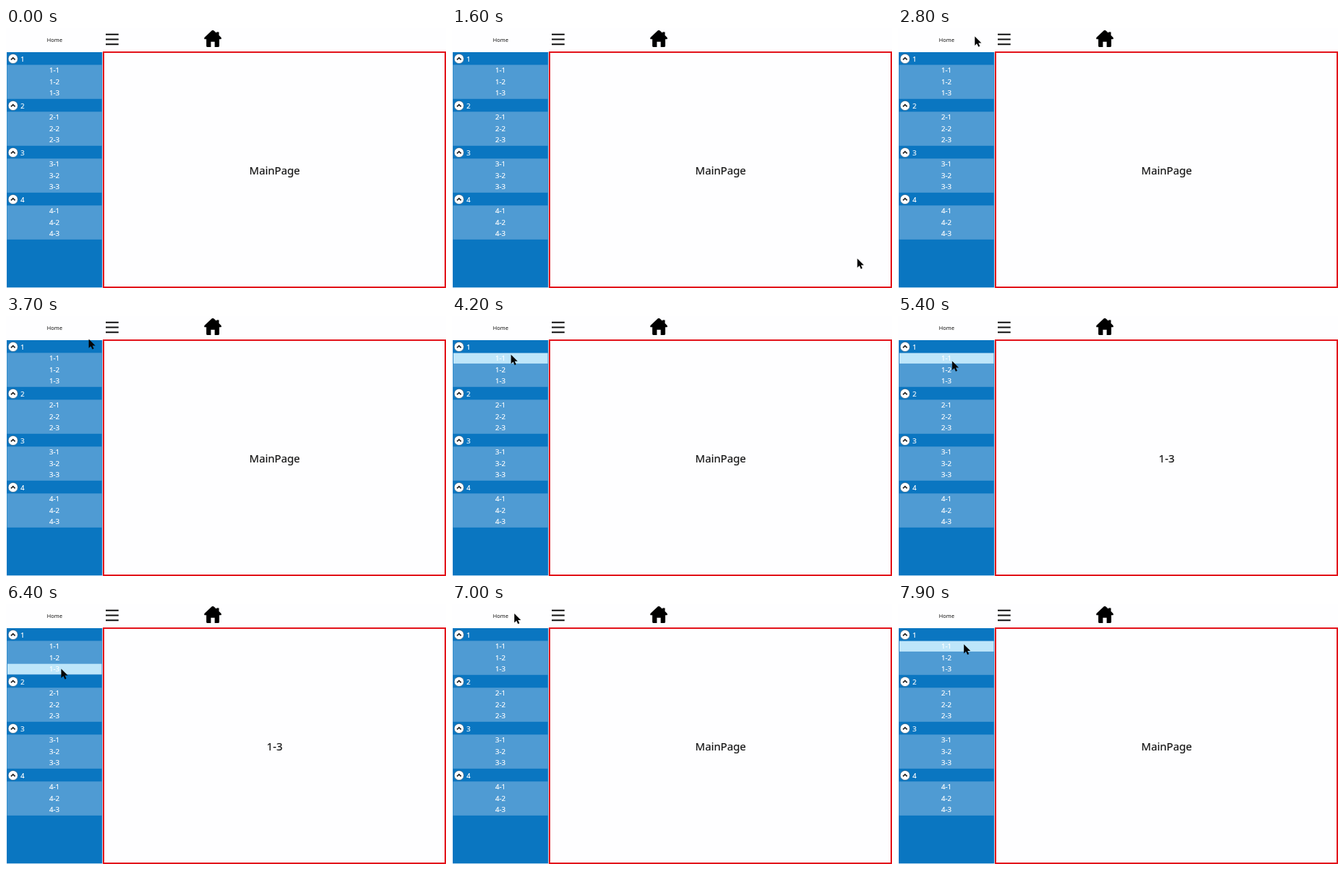
Recreate the animation shown at these times as an HTML page. Size 600 by 355 pixels, loop 8 s.

```html
<!DOCTYPE html>
<html lang="en">
<head>
<meta charset="utf-8">
<title>Side menu</title>
<style>
  html, body { margin: 0; width: 100%; height: 100%; overflow: hidden; background: #fefeff; }
  svg { display: block; width: 600px; height: 355px; }
  text { font-family: "Noto Sans", "Open Sans", sans-serif; fill: #111; }
  .label { font-size: 9.6px; fill: #fff; stroke: #fff; stroke-width: .15px; }
  .mid { text-anchor: middle; }
  #page { font-size: 14.7px; stroke: #111; stroke-width: .15px; }
</style>
</head>
<body>
<svg viewBox="0 0 600 355">
  <text class="mid" x="66.3" y="19" font-size="7.4">Home</text>
  <path d="M136 8.7h17.5M136 15.5h17.5M136 22.3h17.5" stroke="#111" stroke-width="2"/>
  <path d="M280.6 3.6Q282 2.6 283.4 3.6L287 6.8V5.6H290.4V10L293.4 13Q294.4 15.3 292.3 15.3H290.8V24.5Q290.8 26 289.3 26H284.6V18.8H279.4V26H274.7Q273.2 26 273.2 24.5V15.3H271.7Q269.6 15.3 270.6 13Z"/>
  <rect x="1" y="33" width="130.3" height="321.3" fill="#0a76c1"/>
  <g id="menu"></g>
  <rect x="133" y="33" width="466" height="321" fill="none" stroke="#e3141c" stroke-width="2"/>
  <text id="page" class="mid" x="366.3" y="200"></text>
  <path id="cursor" d="M0 0V12.4L2.9 9.8L5 14.2L7 13.2L5 9H9Z" fill="#050505"/>
</svg>
<script>
const LOOP = 8000, STEP = 100;
const GROUPS = 4, ROWS = 3, TOP = 33, PITCH = 64, HEADER = 17.3, ROW = 15.5;
const menu = document.getElementById('menu');
const page = document.getElementById('page');
const cursor = document.getElementById('cursor');

// Places the pointer visits; a click opens whatever lies under it
const stop = (t, x, y, click) => ({ t, x, y, click });
const stops = [
  stop(1500, 590, 340),
  stop(2800, 104.7, 11.5),
  stop(3700, 112.8, 31.4),
  stop(4300, 74, 57, true),
  stop(4700, 68.3, 76.5, true),
  stop(5000, 71, 88, true),
  stop(5400, 73.8, 61.5),
  stop(5700, 80, 21),
  stop(6000, 76, 56, true),
  stop(6400, 75.3, 88.5, true),
  stop(6900, 85, 13, true),
  stop(7700, 85, 13),
  stop(7900, 89.8, 55)
];

let markup = '';
for (let g = 0; g < GROUPS; g++) {
  const y = TOP + g * PITCH;
  markup += `<circle cx="9.6" cy="${y + 9}" r="6.6" fill="#fff" stroke="#24577f" stroke-width=".7"/>
    <path d="M6.8 ${y + 10.4}l2.8-2.8l2.8 2.8" fill="none" stroke="#222" stroke-width="1.6"/>
    <text class="label" x="19.8" y="${y + 12.8}">${g + 1}</text>
    <rect x="1.4" y="${y + HEADER}" width="129.2" height="${ROWS * ROW}" fill="#4f9bd3"/>`;
  for (let r = 0; r < ROWS; r++) {
    const top = y + HEADER + r * ROW;
    markup += `<rect class="item" x="2" y="${top + .4}" width="128.5" height="14.2"/>
      <text class="label mid" x="66" y="${top + 11.1}">${g + 1}-${r + 1}</text>`;
  }
}
menu.innerHTML = markup;
const items = [...menu.querySelectorAll('.item')];

// Index of the menu row at a point, or -1
function rowAt({ x, y }) {
  const g = Math.floor((y - TOP) / PITCH);
  const r = Math.floor((y - TOP - g * PITCH - HEADER) / ROW);
  const inside = x > 1 && x < 131 && g >= 0 && g < GROUPS && r >= 0 && r < ROWS;
  return inside ? g * ROWS + r : -1;
}

function pageName(t) {
  const last = stops.filter(s => s.click && s.t <= t).pop();
  const row = last ? rowAt(last) : -1;
  return row < 0 ? 'MainPage' : `${Math.floor(row / ROWS) + 1}-${row % ROWS + 1}`;
}

function cursorAt(t) {
  const i = stops.findIndex(s => s.t > t);
  if (i === 0) return { x: -50, y: -50 };
  if (i < 0) return stops[stops.length - 1];
  const a = stops[i - 1], b = stops[i];
  const k = (t - a.t) / (b.t - a.t);
  return { x: a.x + (b.x - a.x) * k, y: a.y + (b.y - a.y) * k };
}

function draw(now) {
  const t = Math.floor(now % LOOP / STEP) * STEP;
  const point = cursorAt(t);
  const hovered = rowAt(point);
  cursor.setAttribute('transform', `translate(${point.x} ${point.y})`);
  items.forEach((item, i) => item.setAttribute('fill', i === hovered ? '#bee6fa' : 'none'));
  page.textContent = pageName(t);
  requestAnimationFrame(draw);
}
draw(performance.now());
</script>
</body>
</html>
```
